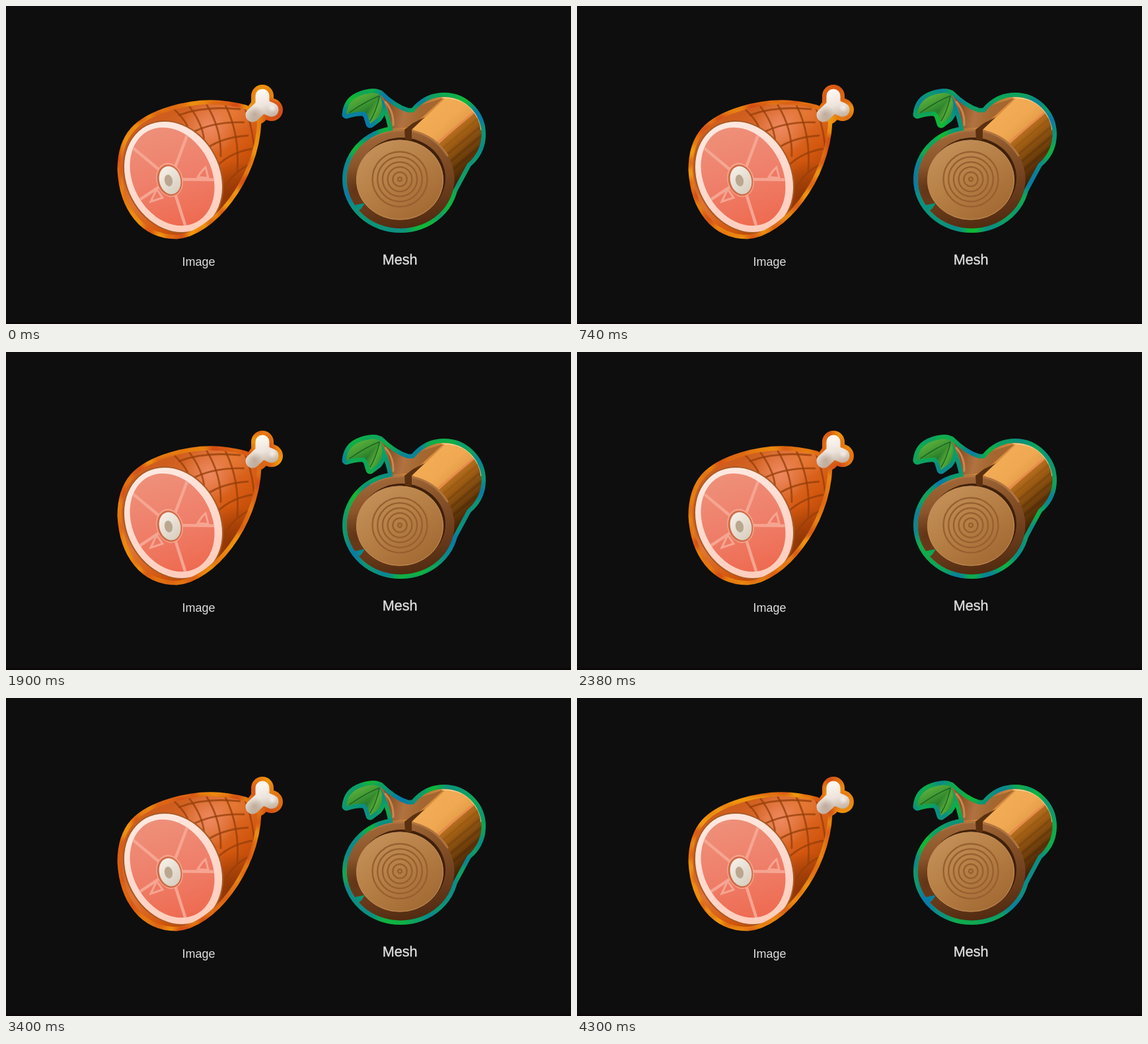
Write an HTML page with a canvas that moves like this. It is 855x481 px and loops after 4.32 s.

```html
<!DOCTYPE html>
<html lang="en">
<head>
<meta charset="utf-8">
<title>Outlined sprites</title>
<style>
html, body { margin: 0; width: 100%; height: 100%; overflow: hidden; background: #0e0e0e; }
canvas { display: block; }
</style>
</head>
<body>
<canvas id="stage" width="855" height="481"></canvas>
<script>
const W = 855, H = 481, LOOP = 4320, STEP = 54, RIM = 6.5;
const view = document.getElementById('stage').getContext('2d');

function layer(w = W, h = H) {
  const c = document.createElement('canvas');
  c.width = w;
  c.height = h;
  return c.getContext('2d');
}

const shape = d => new Path2D(d);

function oval(x, y, rx, ry, turn = 0) {
  const path = new Path2D();
  path.ellipse(x, y, rx, ry, turn, 0, 2 * Math.PI);
  return path;
}

function fill(g, path, style) {
  g.fillStyle = style;
  g.fill(path);
}

function line(g, path, style, width) {
  g.strokeStyle = style;
  g.lineWidth = width;
  g.stroke(path);
}

function ramp(g, x0, y0, x1, y1, ...stops) {
  const r = g.createLinearGradient(x0, y0, x1, y1);
  stops.forEach((c, i) => r.addColorStop(i / (stops.length - 1), c));
  return r;
}

function glow(g, x, y, r, rgb, alpha) {
  const s = g.createRadialGradient(x, y, 0, x, y, r);
  s.addColorStop(0, `rgba(${rgb},${alpha})`);
  s.addColorStop(1, `rgba(${rgb},0)`);
  fill(g, oval(x, y, r, r), s);
}

// Solid parts; the rim is a wider copy behind them
const ham = shape(`M362 156C330 148 296 144 250 158C200 173 175 196 175 248
  C178 305 208 346 258 346C310 343 376 262 380 176Z`);
const bone = shape('M388 136L388 151L402 157M388 151L373 165');
const boneTop = shape('M388 136L388 151L402 157M388 151L380 162');
const BONE = 21;
const front = oval(597, 262, 81.5, 74.5);
const end = oval(663, 194, 56.5, 56.5);
const trunk = shape('M566 134Q586 154 608 161L640 160L701 233L673 285L600 262L584 181Q578 154 566 134Z');
const leaves = [
  shape('M515 164Q517 142 538 135T566 135Q559 153 544 160Q529 159 515 164Z'),
  shape('M566 135Q574 154 563 169L551 178L547 165L543 161Q555 152 566 135Z')
];
const notch = shape('M524 302L543 298L538 306L528 314Z');
const woody = [front, end, trunk];

function drawMask(g) {
  g.lineJoin = g.lineCap = 'round';
  for (const part of [ham, ...woody, ...leaves]) {
    fill(g, part, '#fff');
    line(g, part, '#fff', 2 * RIM);
  }
  line(g, boneTop, '#fff', BONE + 2 * RIM);
}

function drawHam(g) {
  g.globalCompositeOperation = 'source-over';
  fill(g, ham, ramp(g, 265, 150, 382, 270, '#cf5e1e', '#e07334', '#d4580f', '#a33c04'));
  g.globalCompositeOperation = 'source-atop';
  glow(g, 308, 184, 42, '240,140,104', 0.85);
  glow(g, 346, 162, 28, '236,128,56', 0.5);
  glow(g, 338, 290, 58, '128,48,4', 0.7);

  // Crossed scoring
  g.lineCap = 'round';
  for (let i = 0; i < 5; i++) {
    const x0 = 248 + 28 * i, x1 = 275 + 25 * i, y1 = 183 + 22 * i;
    line(g, shape(`M${x0} 150Q${x0 + 22} ${170 + 8 * i} ${x1} ${y1}`), 'rgba(150,62,8,.75)', 2.8);
    const u0 = 354 + 6 * i, v0 = 156 + 20 * i, u1 = 262 + 17 * i, v1 = 165 + 28 * i;
    line(g, shape(`M${u0} ${v0}Q${(u0 + u1) / 2 - 8} ${(v0 + v1) / 2 - 10} ${u1} ${v1}`),
      'rgba(150,62,8,.75)', 2.8);
  }

  const TILT = -.487;
  const rim = oval(253, 258.5, 70, 87, TILT), meat = oval(251.5, 258, 59.5, 78, TILT);
  line(g, rim, '#a95a24', 4);
  fill(g, rim, ramp(g, 215, 175, 275, 342, '#ffeae2', '#ffdace', '#ffcdbc'));
  fill(g, meat, ramp(g, 225, 183, 268, 332, '#ee9079', '#ef806b', '#ee6b51'));
  g.save();
  g.clip(meat);
  for (let i = 0; i < 5; i++) {
    const a = (-142 + 72 * i) * Math.PI / 180;
    line(g, shape(`M249 262L${251 + 90 * Math.cos(a)} ${260 + 90 * Math.sin(a)}`), '#f6a592', 4.5);
  }
  for (const d of ['M290 259Q296 249 302 244L306 260Z', 'M228 277L237 290L219 296Z']) {
    fill(g, shape(d), '#ee7a64');
    line(g, shape(d), '#f6a592', 3);
  }
  g.restore();

  fill(g, oval(247.5, 263, 20, 26, -.25), '#f6a38e');
  fill(g, oval(247.5, 263.5, 18.5, 24, -.25), '#cf6c48');
  fill(g, oval(248, 263.5, 16, 21.5, -.25), ramp(g, 235, 248, 262, 280, '#f4eee5', '#d7cfc0'));
  fill(g, oval(246, 264, 6, 9, -.2), '#bba78f');

  g.globalCompositeOperation = 'source-over';
  g.lineJoin = 'round';
  line(g, bone, ramp(g, 380, 128, 392, 176, '#fffaf4', '#ece3db', '#b7a28f'), BONE);
  glow(g, 376, 163, 13, '150,120,98', 0.4);
  glow(g, 403, 154, 7, '255,255,255', 0.6);
}

function drawLog(g) {
  g.globalCompositeOperation = 'source-over';
  const bark = ramp(g, 620, 145, 710, 248, '#a96a35', '#dc8f3e', '#cd822d', '#a35f14', '#6f3f0b', '#3b1d04');
  woody.forEach(part => fill(g, part, bark));
  g.globalCompositeOperation = 'source-atop';

  // Lit band, then stripes darkening away from it
  fill(g, shape('M614 185L635 168L664 140Q695 140 708 160L650 213Z'),
    ramp(g, 632, 163, 675, 210, '#f3ac56', '#f0a952', '#dd9442'));
  g.lineCap = 'butt';
  for (let i = 0; i < 5; i++) {
    const x = 648 + 6 * i, y = 211 + 10 * i;
    line(g, shape(`M${x} ${y}l62 -52`), i ? `rgba(71,35,3,${.1 * i})` : '#e88b4c', 3 + i / 2);
  }
  g.lineCap = 'round';
  line(g, shape('M660 139Q688 138 703 154T719 187'), '#ffd89a', 1.6);

  fill(g, shape('M566 131Q584 150 606 157L662 139L614 183L580 186Q584 158 566 131Z'),
    ramp(g, 578, 160, 626, 172, '#8d5225', '#b07240', '#a5672f'));
  line(g, shape('M574 145Q587 160 586 180'), '#c98750', 3);

  fill(g, front, ramp(g, 580, 184, 612, 338, '#a36a39', '#875228', '#6c3d1c', '#502a10'));
  line(g, shape('M552 200Q580 184 615 189Q650 197 668 226'), '#b0743f', 3);
  glow(g, 528, 278, 35, '75,37,12', 0.5);
  fill(g, oval(599, 260, 66, 61), '#402009');
  fill(g, oval(596, 263, 66, 60.5), ramp(g, 560, 210, 635, 315, '#c38f58', '#b47d43', '#a36a34'));
  for (let i = 0; i < 6; i++) {
    const r = 3 + 7.7 * i;
    line(g, oval(596, 262, r, r), '#986030', 2.5);
  }
  line(g, oval(596, 263, 65.5, 60), '#c08a52', 1);

  fill(g, shape('M634 168L616 177L603 187L604 202L614 203L614 187Z'), '#5b3010');
  g.globalCompositeOperation = 'destination-out';
  fill(g, notch, '#000');

  g.globalCompositeOperation = 'source-over';
  leaves.forEach((leaf, i) => fill(g, leaf, i
    ? ramp(g, 548, 155, 570, 166, '#2a7a2a', '#55aa38', '#31872c')
    : ramp(g, 529, 137, 542, 163, '#5cae3c', '#429a33', '#267b28')));
  line(g, shape('M565 136Q546 143 520 161M565 137Q560 160 551 174'), '#1c6324', 1.4);
}

function label(g, text, size, x, y) {
  g.font = `${size}px "Liberation Sans", Arial, sans-serif`;
  fill(g, new Path2D(), '#dedede');
  g.fillText(text, x, y);
}

const art = layer(), mask = layer(), rims = layer();
drawMask(mask);
drawHam(art);
drawLog(art);
label(art, 'Image', 18, 266.5, 393);
label(art, 'Mesh', 21.6, 569.7, 391);
line(art, new Path2D(), '#dedede', 0.4);
art.strokeText('Mesh', 569.7, 391);

// Value noise in x, y and time
function hash(x, y, z) {
  let h = Math.imul(x, 374761393) + Math.imul(y, 668265263) + Math.imul(z, 1274126177);
  h = Math.imul(h ^ (h >>> 13), 1103515245);
  return ((h ^ (h >>> 16)) >>> 0) / 4294967295;
}
const ease = t => t * t * (3 - 2 * t);
const mix = (a, b, t) => a + (b - a) * t;

function noise(x, y, z) {
  const i = Math.floor(x), j = Math.floor(y), k = Math.floor(z);
  const u = ease(x - i), v = ease(y - j), w = ease(z - k);
  const plane = n => mix(mix(hash(i, j, n), hash(i + 1, j, n), u),
    mix(hash(i, j + 1, n), hash(i + 1, j + 1, n), u), v);
  return mix(plane(k), plane(k + 1), w);
}

const LEFT = 165, TOP = 116, CELL = 3, COLS = 190, ROWS = 80;
const field = layer(COLS, ROWS), pixels = field.createImageData(COLS, ROWS);
const hot = { size: 5.5, from: [212, 78, 22], to: [240, 152, 14] };
const cool = { size: 8, from: [8, 124, 166], to: [17, 184, 55] };

function paintField(ms) {
  for (let y = 0; y < ROWS; y++) for (let x = 0; x < COLS; x++) {
    const { size, from, to } = x < COLS / 2 ? hot : cool;
    const n = noise(x / size, y / size + ms / 900, ms / 360);
    const k = Math.min(1, Math.max(0, .5 + (n - .5) * 1.2));
    const at = (y * COLS + x) * 4;
    for (let c = 0; c < 3; c++) pixels.data[at + c] = mix(from[c], to[c], k);
    pixels.data[at + 3] = 255;
  }
  field.putImageData(pixels, 0, 0);
}

let last = -1;
function frame(now) {
  const ms = Math.floor((now % LOOP) / STEP) * STEP;
  if (ms !== last) {
    last = ms;
    paintField(ms);
    rims.globalCompositeOperation = 'copy';
    rims.drawImage(mask.canvas, 0, 0);
    rims.globalCompositeOperation = 'source-in';
    rims.drawImage(field.canvas, LEFT, TOP, COLS * CELL, ROWS * CELL);
    view.fillStyle = '#0e0e0e';
    view.fillRect(0, 0, W, H);
    view.fillStyle = '#0c0709';
    view.fillRect(0, 478, W, 3);
    view.drawImage(rims.canvas, 0, 0);
    view.drawImage(art.canvas, 0, 0);
  }
  requestAnimationFrame(frame);
}
frame(performance.now());
</script>
</body>
</html>
```
